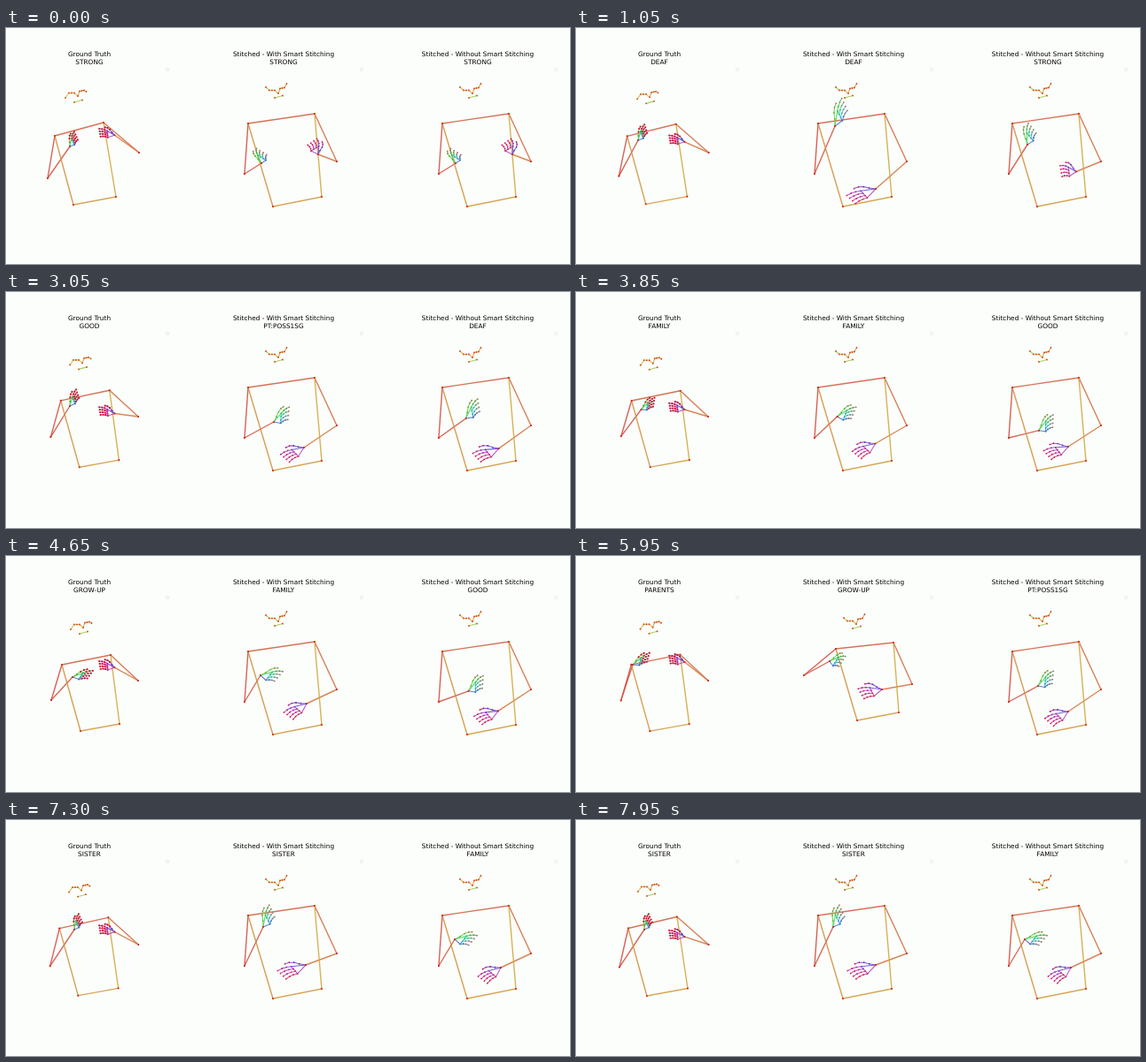
These frames come from a looping animation (636 px wide and 267 px high, 8 s). An HTML page:

```html
<!DOCTYPE html>
<html lang="en">
<head>
<meta charset="utf-8">
<title>Sign stitching comparison</title>
<style>
html, body { margin: 0; width: 100%; height: 100%; overflow: hidden; background: #fcfefb; }
svg { display: block; width: 100vw; height: 100vh; }
text { font: 7.38px "DejaVu Sans", sans-serif; text-anchor: middle; fill: #000; }
line { stroke-linecap: round; stroke-opacity: 0.88; }
</style>
</head>
<body>
<svg id="stage" viewBox="0 0 636 267"></svg>
<script>
const LOOP = 8000, STEP = 50, PITCH = 219;

// Rest position x, y of each joint and how far a full lean moves it.
const SIGNER = {
  nose: [307, 74, 9, 3], sl: [273, 108, 20, -3], sr: [348, 97, 10, 1], el: [269, 165, -12, -30],
  er: [373, 151, 6, -6], hl: [301, 202, 16, -16], hr: [356, 191, 8, -14]
};
const SPEAKER = {
  nose: [81, 77, 6, 4], sl: [55, 122, 8, 1], sr: [110, 107, 8, 5], el: [47, 170, 4, -7],
  er: [150, 141, -1, 0], hl: [76, 200, 8, -2], hr: [124, 191, 4, -1]
};

// Each hand of a sign: wrist x, y and the reach to the middle fingertip.
const SIGNS = {
  STRONG: { l: [288, 153, -1, -15], r: [352, 143, -6, -16] },
  DEAF: { l: [292, 111, 11, -28], r: [338, 182, -31, 12] },
  GOOD: { l: [303, 157, 17, -13], r: [336, 175, -26, 9] },
  'PT:POSS1SG': { l: [302, 147, 18, -12], r: [336, 176, -24, 12] },
  FAMILY: { l: [287, 135, 23, 0], r: [339, 167, -23, 14] },
  'GROW-UP': { l: [286, 119, 16, -1], r: [345, 151, -26, 4], lean: 1 },
  SISTER: { l: [290, 121, 10, -21], r: [338, 164, -30, 11] }
};
const NATURAL = {
  STRONG: { l: [72, 134, 7, -14] },
  DEAF: { l: [70, 127, 9, -15] },
  GOOD: { l: [72, 129, 9, -16] },
  'GROW-UP': { l: [75, 137, 22, -4] },
  PARENTS: { l: [64, 123, 19, -10] },
  SISTER: { l: [77, 124, 7, -15] }
};

// Script entries: when the label appears, when the pose is reached, word.
const panels = [
  {
    title: 'Ground Truth', rest: SPEAKER, signs: NATURAL, shift: 0, span: 5.5, pitch: 1,
    lean: t => Math.sin(Math.PI * t / 9500),
    right: t => [122.5, 129 + 9 * Math.cos(2 * Math.PI * (t - 2700) / 6500), -18, -4],
    script: [[0, 0, 'STRONG'], [450, 1050, 'DEAF'], [1600, 3050, 'GOOD'], [3300, 3300, 'PT:POSS1SG'],
      [3800, 3800, 'FAMILY'], [4500, 4650, 'GROW-UP'], [5400, 5950, 'PARENTS'], [6500, 7300, 'SISTER']]
  },
  {
    title: 'Stitched - With Smart Stitching', rest: SIGNER, signs: SIGNS, shift: 0, span: 8, pitch: 0,
    script: [[0, 0, 'STRONG'], [700, 1050, 'DEAF'], [1600, 2000, 'GOOD'], [2750, 3050, 'PT:POSS1SG'],
      [3800, 4650, 'FAMILY'], [5000, 5950, 'GROW-UP'], [6100, 6300, 'PARENTS'], [7000, 7300, 'SISTER']]
  },
  {
    title: 'Stitched - Without Smart Stitching', rest: SIGNER, signs: SIGNS, shift: PITCH, span: 8, pitch: 0,
    script: [[0, 0, 'STRONG'], [1600, 2100, 'DEAF'], [3250, 3600, 'GOOD'], [5300, 5950, 'PT:POSS1SG'],
      [6500, 7300, 'FAMILY']]
  }
];

// Ear to ear through the nose, then the mouth; the third value is the drop when the head tips back.
const FACE = [
  [-14, -7, 9], [-10, -3.5, 0], [-7, -3.5, 0], [-4, -3.5, 0], [0, 0, 0], [2, -5.5, 0], [4.5, -6, 0], [7, -6.5, 0],
  [9.5, -11, 6], [-4, 5, 2], [5, 2.5, 2]
];

const stage = document.getElementById('stage');
function add(tag, attrs, parent = stage) {
  const node = document.createElementNS('http://www.w3.org/2000/svg', tag);
  for (const k in attrs) node.setAttribute(k, attrs[k]);
  return parent.appendChild(node);
}
const hsl = (h, s = 58, l = 54) => `hsl(${h},${s}%,${l}%)`;
const mix = (a, b, k) => a + (b - a) * k;
const blend = (a, b, k) => a.map((v, i) => mix(v, b[i], k));
const ease = q => q * q * (3 - 2 * q);

function signAt({ script, signs, right, lean }, t) {
  const keys = script.filter(s => signs[s[2]]);
  const i = keys.findLastIndex(s => s[1] <= t);
  const from = keys[i], to = keys[i + 1] || from;
  const k = to === from ? 0 : ease((t - from[1]) / (to[1] - from[1]));
  const a = signs[from[2]], b = signs[to[2]];
  return {
    l: blend(a.l, b.l, k),
    r: right ? right(t) : blend(a.r, b.r, k),
    lean: lean ? lean(t) : mix(a.lean || 0, b.lean || 0, k)
  };
}

// Point of finger f (0 = thumb) at m from knuckle to tip: u along the hand, v across it.
function fingerPoint(f, m) {
  if (f === 0) return [mix(0.2, 0.68, m), mix(-0.45, -1.15, m) - 0.25 * Math.sin(Math.PI * m)];
  const s = f - 1;
  return [mix(0.5 - 0.04 * s, 1 - 0.06 * s, m), mix(-0.5 + 0.42 * s, -0.6 + 0.5 * s, m) - 0.12 * Math.sin(Math.PI * m)];
}

function addHand(p, side, [x, y, ax, ay], span) {
  const turn = side === 'l' ? Math.PI / 2 + 0.44 : -Math.PI / 2;
  const across = Math.atan2(ay, ax) + turn;
  const bx = span * Math.cos(across), by = span * Math.sin(across);
  p['w' + side] = [x, y];
  for (let f = 0; f < 5; f++) for (let n = 0; n < 4; n++) {
    const [u, v] = fingerPoint(f, n / 3);
    p[side + f + n] = [x + u * ax + v * bx, y + u * ay + v * by];
  }
}

function pose(panel, t) {
  const sign = signAt(panel, t), p = {};
  for (const name in panel.rest) {
    const [x, y, dx, dy] = panel.rest[name];
    p[name] = [x + dx * sign.lean, y + dy * sign.lean];
  }
  FACE.forEach(([x, y, drop], n) => p['f' + n] = [p.nose[0] + x, p.nose[1] + y + drop * panel.pitch]);
  addHand(p, 'l', sign.l, panel.span);
  addHand(p, 'r', sign.r, panel.span);
  return p;
}

function build(panel, index) {
  const x = 94 + PITCH * index;
  const heading = y => add('text', { x, y });
  heading(32.3).textContent = panel.title;
  panel.label = heading(41.3);
  add('rect', { x: x + 86.5, y: 45.5, width: 3, height: 3, rx: 0.6, fill: 'none', stroke: '#e3e5e3', 'stroke-width': 0.7 });
  panel.lines = [];
  panel.dots = [];
  const g = add('g', { transform: `translate(${panel.shift} 0)` });
  const line = (from, to, stroke, width = 1.1) =>
    panel.lines.push([add('line', { stroke, 'stroke-width': width }, g), from, to]);
  const dot = (at, fill, r) => panel.dots.push([add('circle', { fill, r }, g), at]);

  const bones = ['sl sr 13', 'sl el 4', 'el wl 8', 'sr er 18', 'er wr 22', 'sl hl 33', 'sr hr 42', 'hl hr 37'];
  for (const bone of bones) {
    const [from, to, hue] = bone.split(' ');
    line(from, to, hsl(hue, 62, 54), 1.4);
  }
  for (let n = 0; n < 8; n++) line('f' + n, 'f' + (n + 1), hsl(n < 4 ? 50 : 38));
  line('f9', 'f10', hsl(85));

  for (const side of 'lr') {
    const hue = f => side === 'l' ? 105 + 26 * f : 262 + 18 * f;
    line('w' + side, side + '00', hsl(hue(0)));
    line('w' + side, side + '10', hsl(side === 'l' ? 135 : 255));
    line('w' + side, side + '40', hsl(side === 'l' ? 220 : 285));
    for (let f = 0; f < 5; f++) {
      if (f > 1) line(side + (f - 1) + 0, side + f + 0, hsl(hue(f)));
      for (let n = 0; n < 3; n++) line(side + f + n, side + f + (n + 1), hsl(hue(f)));
    }
    const tip = index === 0 ? '#d01030' : side === 'l' ? '#a8705c' : '#d8184c';
    for (let f = 0; f < 5; f++) for (let n = 0; n < 4; n++) {
      dot(side + f + n, n > (index ? 1 : 0) ? tip : hsl(hue(f), 55, 45), index ? 0.85 : 1.1);
    }
  }
  for (const joint of ['s', 'e', 'w', 'h']) for (const side of 'lr') dot(joint + side, '#d0281c', 1.05);
  for (let n = 0; n < FACE.length; n++) dot('f' + n, '#d4501f', 0.95);
}

function place(node, attrs) {
  for (const k in attrs) node.setAttribute(k, attrs[k]);
}

function draw(t) {
  for (const panel of panels) {
    const p = pose(panel, t);
    panel.label.textContent = panel.script.findLast(s => s[0] <= t)[2];
    for (const [node, a, b] of panel.lines) place(node, { x1: p[a][0], y1: p[a][1], x2: p[b][0], y2: p[b][1] });
    for (const [node, at] of panel.dots) place(node, { cx: p[at][0], cy: p[at][1] });
  }
}

panels.forEach(build);
const start = performance.now();
function tick() {
  const t = Math.max(0, performance.now() - start) % LOOP;
  draw(Math.floor(t / STEP) * STEP);
  requestAnimationFrame(tick);
}
tick();
</script>
</body>
</html>
```
